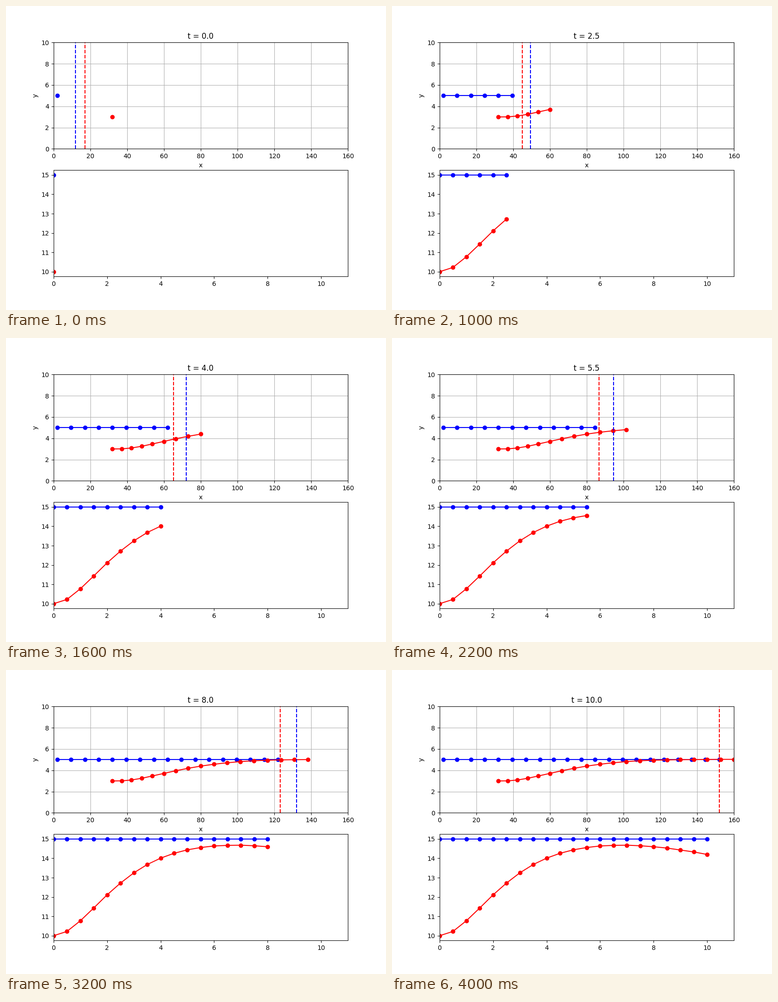
Animation, 837 px wide and 669 px high, one loop 4.2 s. Source, as a matplotlib script:

```python
import numpy as np
import matplotlib.pyplot as plt
from matplotlib.animation import FuncAnimation

STEP = 0.5
BLUE_SPEED = 15.0
BLUE_LOOKAHEAD = 10
RED_GAP = 15

# Speed and lateral position of the red vehicle at each time step.
red_speed = np.array([10, 10.22, 10.77, 11.43, 12.11, 12.72, 13.25, 13.68,
                      14.01, 14.26, 14.44, 14.56, 14.64, 14.67, 14.68, 14.65,
                      14.60, 14.53, 14.43, 14.33, 14.20])
red_y = np.array([3, 3.01, 3.09, 3.25, 3.47, 3.71, 3.96, 4.19, 4.40, 4.57,
                  4.71, 4.82, 4.90, 4.95, 4.98, 5.0, 5.01, 5.02, 5.03, 5.03,
                  5.03])

count = len(red_speed)
time = np.arange(count) * STEP
blue_speed = np.full(count, BLUE_SPEED)
blue_x = 2 + BLUE_SPEED * time
blue_y = np.full(count, 5.0)
mean_speed = (red_speed[1:] + red_speed[:-1]) / 2
red_x = 32 + np.concatenate([[0], np.cumsum(mean_speed * STEP)])

# The small margin keeps the pixel size from being rounded down.
fig, (road, speed) = plt.subplots(2, 1, figsize=(8.3701, 6.6901), dpi=100)
fig.subplots_adjust(left=0.125, right=0.9, bottom=0.11, top=0.88, hspace=0.2)

road.set(xlim=(0, 160), ylim=(0, 10), xlabel="x", ylabel="y")
road.grid(True)
title = road.set_title("t = 0.0")
speed.set(xlim=(0, 11), ylim=(9.75, 15.25))


def trail(ax, color):
    return ax.plot([], [], "o-", color=color)[0]


trails = [
    (trail(road, "blue"), blue_x, blue_y),
    (trail(road, "red"), red_x, red_y),
    (trail(speed, "blue"), time, blue_speed),
    (trail(speed, "red"), time, red_speed),
]
markers = [
    (road.axvline(0, color="blue", linestyle="--"), blue_x + BLUE_LOOKAHEAD),
    (road.axvline(0, color="red", linestyle="--"), red_x - RED_GAP),
]


def update(i):
    for line, xs, ys in trails:
        line.set_data(xs[:i + 1], ys[:i + 1])
    for line, xs in markers:
        line.set_xdata([xs[i], xs[i]])
    title.set_text(f"t = {time[i]:.1f}")
    return [entry[0] for entry in trails + markers] + [title]


anim = FuncAnimation(fig, update, frames=count, interval=200,
                     repeat=True, repeat_delay=0, blit=False)
plt.show()
```
